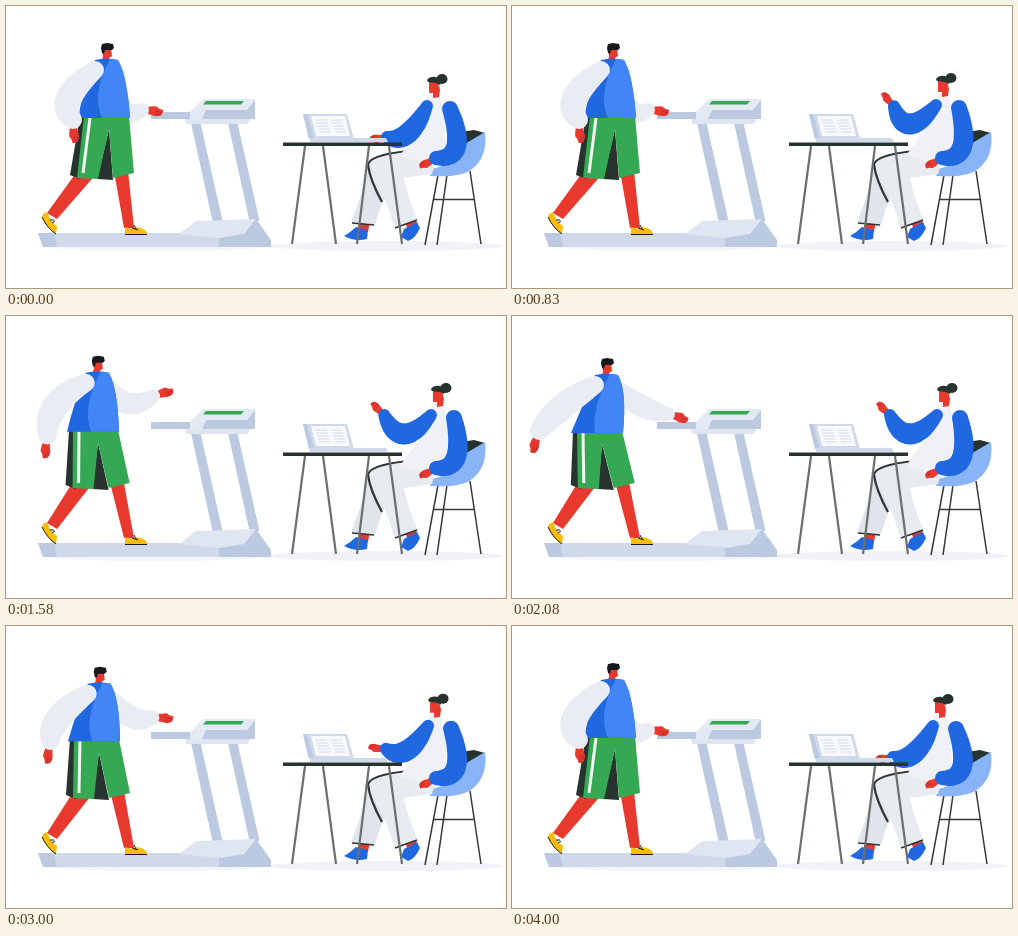
These frames come from a looping animation (500x282 px, 4080 ms). An HTML page with a canvas:

```html
<!DOCTYPE html>
<html lang="en">
<head>
<meta charset="utf-8">
<style>
  html, body { margin: 0; width: 100%; height: 100%; overflow: hidden; background: #fff; }
  canvas { display: block; }
</style>
</head>
<body>
<canvas id="stage" width="500" height="282"></canvas>
<script>
const ctx = document.getElementById('stage').getContext('2d');
const LOOP = 4080, STEPS = 49;
const SKIN = '#e8392f', SLEEVE = '#e9ecf3', BLUE = '#2068e0', LIGHT_BLUE = '#4285f4', GREEN = '#34a853';
const DARK = '#26332f', INK = '#17191c', STEEL = '#bccae1', MIST = '#cfd9ea', PALE = '#dfe6f2';

// Joints of each pose; everything else on the body follows from them
const onRail = { neck: [101, 54], hip: [98, 112], backElbow: [63, 92], backWrist: [67, 114], elbow: [116, 102], wrist: [136, 104] };
const openArms = { neck: [91, 57], hip: [86, 116], backElbow: [49, 89], backWrist: [39, 120], elbow: [122, 86], wrist: [148, 78] };
const leanBack = { neck: [95, 59], hip: [85, 117], backElbow: [50, 91], backWrist: [27, 115], elbow: [130, 90], wrist: [156, 98] };
const returning = { neck: [92, 56], hip: [92, 113], backElbow: [58, 92], backWrist: [68, 115], elbow: [118, 92], wrist: [133, 83] };
const manKeys = [[0, onRail], [920, onRail], [1580, openArms], [2000, leanBack], [2740, leanBack],
  [3330, returning], [3650, onRail], [LOOP, onRail]];

const typing = { neck: [428, 89], elbow: [401, 128], wrist: [381, 131] };
const handUp = { neck: [431, 88], elbow: [398, 118], wrist: [382, 100] };
const explaining = { neck: [432, 88], elbow: [398, 118], wrist: [378, 99] };
const lowering = { neck: [431, 88], elbow: [399, 119], wrist: [378, 108] };
const womanKeys = [[0, typing], [120, typing], [760, handUp], [1580, explaining], [2150, explaining],
  [2670, lowering], [3200, typing], [LOOP, typing]];

const mix = (a, b, u) => a + (b - a) * u;
const ease = u => (u + u * u * (3 - 2 * u)) / 2;

function poseAt(keys, t) {
  const i = keys.findIndex(key => key[0] > t);
  const [[t0, from], [t1, to]] = [keys[i - 1], keys[i]];
  const u = ease((t - t0) / (t1 - t0));
  return Object.fromEntries(Object.keys(from).map(name =>
    [name, from[name].map((v, k) => mix(v, to[name][k], u))]));
}

function fill(color, path) {
  ctx.fillStyle = color;
  ctx.fill(new Path2D(path));
}

function line(color, width, path) {
  ctx.strokeStyle = color;
  ctx.lineWidth = width;
  ctx.stroke(new Path2D(path));
}

function oval(color, x, y, rx, ry = rx) {
  ctx.fillStyle = color;
  ctx.beginPath();
  ctx.ellipse(x, y, rx, ry, 0, 0, 7);
  ctx.fill();
}

function hand(x, y, angle, size, flip) {
  ctx.save();
  ctx.translate(x, y);
  ctx.rotate(angle);
  ctx.scale(size, size * flip);
  fill(SKIN, 'M-3 -3Q4 -5 8 -5L11 -3L15 -2L15 0L14 3Q9 6 4 4L-3 3Z');
  line('#a8232a', .7, 'M8 0L14 .5M8 2.5L12 3');
  ctx.restore();
}

// A sleeve bending through the elbow, its radius easing from joint to joint.
// droop turns the hand from the forearm's direction towards straight down.
function arm(color, shoulder, elbow, wrist, radii, { size = 1, flip = 1, droop = 0 } = {}) {
  const [dx, dy] = [wrist[0] - elbow[0], wrist[1] - elbow[1]];
  const angle = mix(Math.atan2(dy, dx), Math.PI / 2, droop);
  const reach = radii[2] - 1;
  hand(wrist[0] + Math.cos(angle) * reach, wrist[1] + Math.sin(angle) * reach, angle, size, flip);

  const along = (a, b, c, u) => a * (1 - u) * (1 - 2 * u) + b * 4 * u * (1 - u) + c * u * (2 * u - 1);
  ctx.fillStyle = color;
  ctx.beginPath();
  for (let u = 0; u <= 1; u += 1 / 64) {
    const x = along(shoulder[0], elbow[0], wrist[0], u);
    const y = along(shoulder[1], elbow[1], wrist[1], u);
    const r = along(...radii, u);
    ctx.moveTo(x + r, y);
    ctx.arc(x, y, r, 0, 7);
  }
  ctx.fill();
}

function treadmill() {
  oval('#f1f2f8', 380, 240, 117, 5);
  oval('#f4f5f9', 150, 241, 105, 4);
  fill(MIST, 'M32 227H213V241H37Z');
  fill(STEEL, 'M32 227H48L51 241H37Z');
  for (const x of [185, 222]) fill(STEEL, `M${x} 117h9.5l22 98h-10Z`);
  fill(STEEL, 'M238 226L250 213L265 234V241H213V229Z');
  fill(PALE, 'M173 228L190 215L250 213L238 228L213 232Z');
  fill(STEEL, 'M145 106H190V113H145Z');
  fill(PALE, 'M179 113H244L242 118H180Z');
  fill('#e4eaf4', 'M184 106L197 93H249V113H184Z');
  fill(STEEL, 'M200 104H241L249 94V113H196Z');
  fill(GREEN, 'M200 95H238L235 98.5H197Z');
}

function drawMan({ neck: [nx, ny], hip: [hx, hy], backElbow, backWrist, elbow, wrist }) {
  const knee = x => x + (hx - 98) * .4;
  arm(SLEEVE, [nx + 10, ny + 13], elbow, wrist, [8, 11, 7]);

  fill(SKIN, `M${knee(75)} 160L${knee(92)} 166L51 213L41 207Z`);
  fill(SKIN, `M${knee(108)} 165H${knee(122)}L128 222H118Z`);
  fill('#fbbc05', 'M37 208L41 206Q45 217 51 220L50 228Q41 222 36 211Z');
  fill('#fbbc05', 'M119 221L126 223L131 221Q141 223 141 228H119Z');
  line(INK, 1, 'M36 211Q41 222 50 228M119 228.5H141M126 222L132 224M128 219L130 223M44 214H48M46 217L49 215');

  const crotch = `${hx + 5} ${hy + 11}`, top = hy - 2;
  fill(DARK, `M${hx - 24} ${top}L${knee(64)} 169L${knee(74)} 173L${hx} ${top}Z`);
  fill(DARK, `M${crotch}L${knee(91)} 173L${knee(107)} 174Z`);
  fill(GREEN, `M${hx - 20} ${top}H${hx + 8}L${crotch}L${knee(92)} 173L${knee(71)} 172Z`);
  fill(GREEN, `M${hx} ${top}H${hx + 25}L${knee(128)} 167L${knee(107)} 172L${crotch}Z`);
  line('#f4f8f5', 3, `M${hx - 14} ${hy}L${knee(77)} 167`);

  const left = nx - 12, right = nx + 11;
  const edge = `Q${nx + 20} ${ny + 16} ${hx + 26} ${hy}`;
  fill(SKIN, `M${nx - 5} ${ny - 12}h9l1 8l-3 2v3h-7l1 -5Z`);
  fill(BLUE, `M${left} ${ny}Q${nx} ${ny - 3} ${right} ${ny}${edge}H${hx - 26}Q${left - 12} ${ny + 30} ${left} ${ny}Z`);
  fill(LIGHT_BLUE, `M${nx + 3} ${ny - 1}L${right} ${ny}${edge}H${hx - 2}Q${nx - 16} ${ny + 34} ${nx + 3} ${ny - 1}Z`);
  fill(INK, `M${nx - 6} ${ny - 12}l1 -4l5 -1l6 1l1 4l-2 2l-7 0l-1 4l-2 -1Z`);
  arm(SLEEVE, [left, ny + 10], backElbow, backWrist, [9, 13, 9], { flip: -1, droop: .6 });
}

function desk() {
  fill(MIST, 'M297 108H341L348 133H303Z');
  fill(STEEL, 'M297 108H301L308 133H303Z');
  fill('#f7f9fc', 'M305 110H339L344 130H310Z');
  for (let i = 0; i < 5; i++) line(PALE, 1.3, `M${309 + i} ${114 + i * 3}h12m4 0h11`);
  fill(MIST, 'M304 132H380L382 136H304Z');
  line('#6b706f', 2.2, 'M299 140L286 238M317 140L330 238M363 140L351 238M383 140L396 238');
  fill(DARK, 'M277 136.5H396V140H277Z');
}

function chair() {
  line('#34383a', 1.5, 'M432 169L419 239M441 169L431 239M464 165L475 238M427 193.5H469');
  fill(DARK, 'M455 126L468 124L479 127L470 140L452 155Z');
  fill('#8ab4f8', 'M479 126Q482 151 466 163Q455 172 424 170L426 163Q449 158 457 139Z');
}

function drawWoman({ neck: [nx, ny], elbow, wrist }) {
  fill(SKIN, 'M353 215H364L362 226H352ZM398 212L409 210L412 221L402 225Z');
  fill(BLUE, 'M338 230Q345 226 350 221L362 224L361 233Q349 236 338 230ZM395 231L398 223L411 216L414 222Q409 233 402 235Z');
  fill('#e0e4eb', 'M364 153L385 146L392 170Q376 190 369 219L345 216Q358 185 361 162Z');
  fill('#e8ebf0', 'M362 160Q368 150 396 146L432 147L426 168L398 172Q402 193 412 214L388 222Q381 190 362 166Z');
  line('#303436', 2.2, 'M402 145Q363 149 362 159Q364 174 376 196');
  line('#303436', 1.5, 'M346 217L368 219M389 222L411 214');

  fill('#f0f1f6', `M${nx - 6} ${ny + 2}Q${nx} ${ny - 3} ${nx + 6} ${ny + 1}L${nx + 11} 115L440 150L430 160L394 150Q402 138 ${nx - 15} 118Z`);
  fill(SKIN, `M${nx - 5} ${ny - 13}h9l2 8l-1 7l-6 1v-5h-4Z`);
  oval(DARK, nx + 8, ny - 16, 5.5, 5);
  fill(DARK, `M${nx - 7} ${ny - 15}q3 -4 9 -3q7 3 4 8l-4 -2l-8 -1Z`);
  arm(BLUE, [nx + 16, ny + 14], [450, 141], [430, 152], [8, 10, 7], { size: .85 });
  arm(BLUE, [nx - 7, ny + 11], elbow, wrist, [6, 10.5, 6], { size: .85 });
}

const start = performance.now();
function frame() {
  const phase = (performance.now() - start) % LOOP / LOOP;
  const t = Math.floor(phase * STEPS) * LOOP / STEPS;
  ctx.clearRect(0, 0, 500, 282);
  treadmill();
  drawMan(poseAt(manKeys, t));
  chair();
  drawWoman(poseAt(womanKeys, t));
  desk();
  requestAnimationFrame(frame);
}
frame();
</script>
</body>
</html>
```
